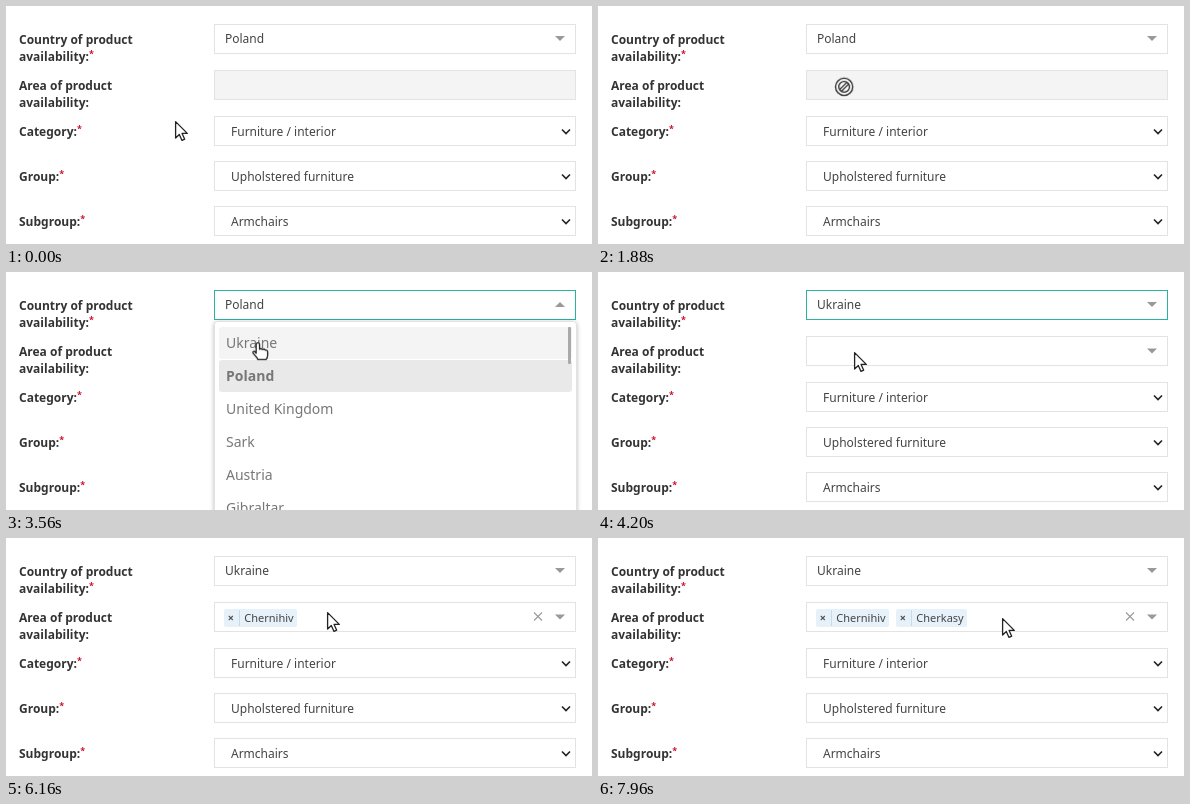
An HTML page for the animation above (8 s loop, 586x238 px).

```html
<!DOCTYPE html>
<html lang="en">
<head>
<meta charset="utf-8">
<title>Product availability form</title>
<style>
html, body { margin: 0; width: 100%; height: 100%; overflow: hidden; background: #fff; }
svg { display: block; width: 586px; height: 238px; font: 12px "Noto Sans", "Open Sans", sans-serif; fill: #444; }
.label { font-weight: 700; fill: #333; }
.star { font-size: 9px; fill: #d0102c; }
.box { fill: #fff; stroke: #e3e3e3; }
.off { fill: #f4f4f4; }
.focus { fill: none; stroke: #2bb3a0; }
.tri { fill: #999; }
.chevron { fill: none; stroke: #222; stroke-width: 1.6; }
.chip { font-size: 11px; }
.chip rect { fill: #e6f1fa; }
.chip .rule { stroke: #c3dbee; }
.x { fill: none; stroke: #555; stroke-width: 1.1; }
.clear { stroke: #999; }
.panel { fill: #fff; stroke: #e2e2e2; filter: drop-shadow(0 1px 2px rgba(0, 0, 0, .28)); }
.item { font-size: 14px; fill: #777; }
.bold { font-weight: 700; }
.picked { fill: #e9e9e9; }
.hover { fill: #f4f4f4; }
.bar { fill: #aaa; }
.ink { fill: #fff; stroke: #222; stroke-width: 1.3; stroke-linejoin: round; }

/* 1% = 80 ms */
[class*="s-"] { animation: 8s step-end infinite; }
.s-before   { animation-name: before; }
.s-after    { animation-name: after; }
.s-focus    { animation-name: focus; }
.s-list1    { animation-name: list1; }
.s-closed1  { animation-name: closed1; }
.s-list2    { animation-name: list2; }
.s-closed2  { animation-name: closed2; }
.s-chip1    { animation-name: chip1; }
.s-nochip1  { animation-name: nochip1; }
.s-chip2    { animation-name: chip2; }
.s-hover1   { animation-name: hover1; }
.s-hover2   { animation-name: hover2; }
.s-caret    { animation-name: caret; }
.s-arrow    { animation-name: arrow; }
.s-ban      { animation-name: ban; }
.s-hand     { animation-name: hand; }
@keyframes before  { 0% { opacity: 1 } 46.5%, 100% { opacity: 0 } }
@keyframes after   { 0% { opacity: 0 } 46.5%, 100% { opacity: 1 } }
@keyframes focus   { 0%, 56.5%, 100% { opacity: 0 } 35.5% { opacity: 1 } }
@keyframes list1   { 0%, 46.5%, 100% { opacity: 0 } 35.5% { opacity: 1 } }
@keyframes closed1 { 0%, 46.5%, 100% { opacity: 1 } 35.5% { opacity: 0 } }
@keyframes list2   { 0%, 68%, 92%, 100% { opacity: 0 } 56.5%, 78.5% { opacity: 1 } }
@keyframes closed2 { 0%, 56.5%, 78.5% { opacity: 0 } 46.5%, 68%, 92%, 100% { opacity: 1 } }
@keyframes chip1   { 0% { opacity: 0 } 68%, 100% { opacity: 1 } }
@keyframes nochip1 { 0% { opacity: 1 } 68%, 100% { opacity: 0 } }
@keyframes chip2   { 0% { opacity: 0 } 92%, 100% { opacity: 1 } }
@keyframes hover1  { 0%, 46.5%, 100% { opacity: 0 } 41% { opacity: 1 } }
@keyframes hover2  { 0%, 92%, 100% { opacity: 0 } 87.5% { opacity: 1 } }
@keyframes caret   { 0%, 41.75%, 100% { opacity: 0 } 35.5% { opacity: 1 } }
@keyframes arrow   {
  0%, 25.3%, 46.5%, 68%, 92%, 100% { opacity: 1 }
  3.4%, 41%, 61.2%, 83.7% { opacity: 0 }
}
@keyframes ban     { 0%, 25.3%, 100% { opacity: 0 } 3.4% { opacity: 1 } }
@keyframes hand    {
  0%, 46.5%, 68%, 92%, 100% { opacity: 0 }
  41%, 61.2%, 83.7% { opacity: 1 }
}

#pointer { animation: move 8s ease-in-out infinite; }
@keyframes move {
  0%, 1%       { transform: translate(169px, 115px) }
  5.5%         { transform: translate(280px, 84px) }
  11.5%        { transform: translate(241.5px, 78px) }
  16%          { transform: translate(286px, 83px) }
  22%          { transform: translate(246px, 85px) }
  30%, 35.5%   { transform: translate(248px, 27px) }
  45.5%, 46.5% { transform: translate(252px, 72px) }
  52.5%, 53%   { transform: translate(256px, 80px) }
  55.5%, 56.5% { transform: translate(260px, 82px) }
  66.5%, 68%   { transform: translate(290px, 116px) }
  77%, 78.5%   { transform: translate(321px, 74px) }
  90.5%, 92%   { transform: translate(322px, 143px) }
  99.5%, 100%  { transform: translate(404px, 80px) }
}
</style>
</head>
<body>
<svg id="stage" viewBox="0 0 586 238"></svg>
<script>
const text = (x, y, s, cls = "") => `<text x="${x}" y="${y}" class="${cls}">${s}</text>`;
const rect = (x, y, w, h, cls, r = 0) =>
  `<rect x="${x}" y="${y}" width="${w}" height="${h}" rx="${r}" class="${cls}"/>`;
const group = (cls, ...parts) => `<g class="${cls}">${parts.join("")}</g>`;
const path = (d, cls) => `<path d="${d}" class="${cls}"/>`;

const label = (y, s, star) =>
  text(13, y, s + (star ? '<tspan class="star" dy="-4">*</tspan>' : ""), "label");
const field = (y, cls = "box") => rect(208.5, y + .5, 361, 29, cls);
const down = (y, cls) => path(`M549 ${y - 2.5}h10l-5 5z`, "tri " + cls);
const up = (y, cls) => path(`M549 ${y + 2.5}h10l-5 -5z`, "tri " + cls);
const cross = (x, y, r, cls = "") =>
  path(`M${x - r} ${y - r}l${2 * r} ${2 * r}m0 ${-2 * r}l${-2 * r} ${2 * r}`, "x " + cls);

const select = (y, name, value) =>
  label(y + 20, name, true) + field(y) + text(225, y + 20, value) +
  path(`M556 ${y + 13.5}l4 4l4 -4`, "chevron");

const chip = (x, w, s, cls) => group("chip " + cls,
  rect(x, 71, w, 18, "", 2),
  cross(x + 6.8, 80, 2),
  path(`M${x + 15.5} 72v16`, "rule"),
  text(x + 20.3, 84, s));

const item = (top, i, s, cls = "") => text(220, top + 26 + 33 * i, s, "item " + cls);
const shade = (top, i, cls) => rect(213, top + 5 + 33 * i, 353, 32, cls, 3);
const panel = top => rect(208.5, top - .5, 362, 220, "panel", 3);

const countries = ["Ukraine", "", "United Kingdom", "Sark", "Austria", "Gibraltar"];
const areas = ["", "Cherkasy", "Chernivtsi", "Dnipropetrovsk"];
const items = (top, names) => names.map((s, i) => item(top, i, s)).join("");

document.getElementById("stage").innerHTML = [
  label(38, "Country of product"), label(55, "availability:", true),
  field(18), field(18, "focus s-focus"),
  text(219, 37, "Poland", "s-before"), text(219, 37, "Ukraine", "s-after"),
  rect(219.5, 25, 1, 15, "s-caret"),
  down(32.5, "s-closed1"), up(32.5, "s-list1"),

  label(84, "Area of product"), label(101, "availability:"),
  field(64), field(64, "box off s-before"),
  down(79, "s-closed2"), up(79, "s-list2"),
  chip(218, 73, "Chernihiv", "s-chip1"), chip(298, 71, "Cherkasy", "s-chip2"),
  group("s-chip1", cross(532, 78.5, 4, "clear")),

  select(110, "Category:", "Furniture / interior"),
  select(155, "Group:", "Upholstered furniture"),
  select(200, "Subgroup:", "Armchairs"),

  group("s-list1",
    panel(50), shade(50, 0, "hover s-hover1"), shade(50, 1, "picked"),
    items(50, countries), item(50, 1, "Poland", "bold"),
    rect(562, 55, 3, 37, "bar", 1)),

  group("s-list2",
    panel(96),
    group("s-nochip1", shade(96, 0, "hover"), item(96, 0, "Chernihiv")),
    group("s-chip1", shade(96, 0, "picked"), item(96, 0, "Chernihiv", "bold")),
    shade(96, 1, "hover s-hover2"), items(96, areas),
    rect(562, 101, 3, 57, "bar", 1)),

  '<g id="pointer">',
  path("M.6 .6V17L4.3 13.5L7 19.4L9.7 18.2L7.1 12.4H12.3Z", "ink s-arrow"),
  group("s-ban",
    '<circle r="8.6" class="ink"/><circle r="5.4" class="ink"/>',
    path("M-4.4 2.6L2.6 -4.4M-2.6 4.4L4.4 -2.6", "ink")),
  path("M-1.8 10V1.3a1.7 1.7 0 0 1 3.4 0V6q1.7 -1.2 2.9 .3q1.8 -.9 2.8 .6q2.4 -.4 2.4 2V12" +
    "q0 2.5 -1.6 4.4H0q-1 -2.4 -3 -4.2l-2 -2.4q-.4 -2 1.6 -1.6z", "ink s-hand"),
  "</g>"
].join("");
</script>
</body>
</html>
```
